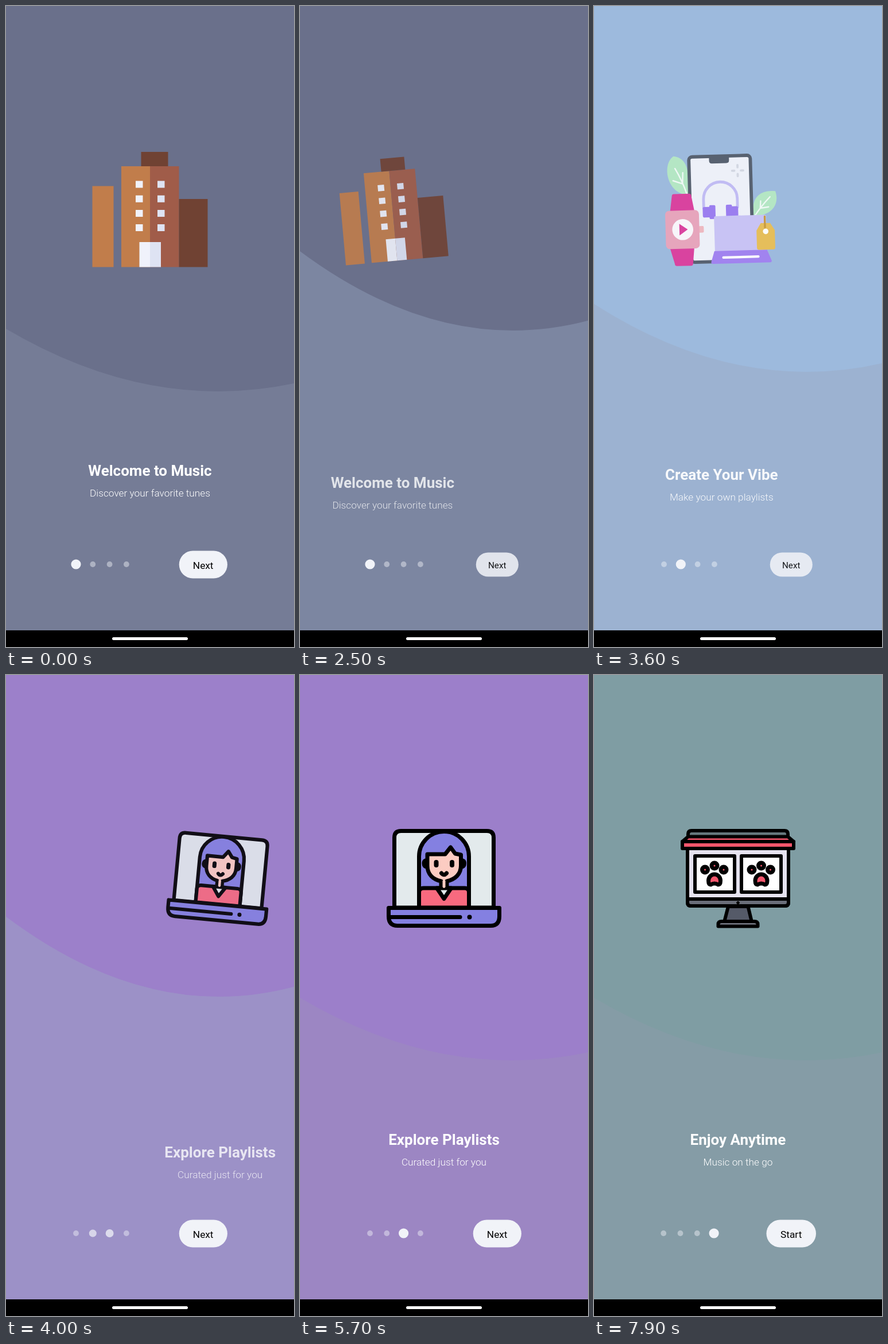
An HTML page that plays this animation: 502 px wide and 1116 px high, repeating every 8 s.

```html
<!DOCTYPE html>
<html lang="en">
<head>
<meta charset="utf-8">
<title>Onboarding</title>
<style>
  html, body { margin: 0; width: 100%; height: 100%; overflow: hidden; background: #000; }
  svg { display: block; width: 502px; height: 1116px; }
  text { font-family: Roboto, "Open Sans", sans-serif; text-anchor: middle; }
  .title { font-size: 26px; font-weight: 700; fill: #fff; }
  .sub { font-size: 17.25px; font-weight: 300; fill: #fff; }
  .label { font-size: 17.25px; fill: #000; }
  .ink { stroke: #000; stroke-width: 7; stroke-linejoin: round; stroke-linecap: round; }
</style>
</head>
<body>
<svg viewBox="0 0 502 1116">
  <defs>
    <g id="paw" class="ink" stroke-width="6" fill="#f4566c">
      <circle cx="-16.5" cy="-8" r="5"/>
      <circle cx="0" cy="-15" r="5"/>
      <circle cx="16" cy="-8" r="5"/>
      <path d="M-10.5 11a10.5 11 0 0 1 21 0q0 7-4 7q-6.500-4-13 0q-4 0-4-7z"/>
    </g>
  </defs>

  <rect id="floor" width="502" height="1116"/>
  <path id="sky"/>

  <g class="page">
    <g class="icon" shape-rendering="geometricPrecision">
      <path fill="#c17d4b" d="M150.500 313.500h37v141h-37zM201 279h50v175.500h-50z"/>
      <path fill="#a05c49" d="M251 279h50.500v175.500H251z"/>
      <path fill="#704233" d="M235.500 254h47v25h-47zM301.500 336h50v118.500h-50z"/>
      <path fill="#f0f2fb" d="M226 304.500h12.500v12H226zm0 25.200h12.500v12H226zm0 25.200h12.500v12H226zm0 25.200h12.500v12H226zM232.500 411H251v43.500h-18.500z"/>
      <path fill="#dee3f3" d="M264 304.500h12.500v12H264zm0 25.200h12.500v12H264zm0 25.200h12.500v12H264zm0 25.200h12.500v12H264zM251 411h19v43.500h-19z"/>
    </g>
    <g class="copy"><text class="title" x="251" y="818">Welcome to Music</text><text class="sub" x="251" y="854">Discover your favorite tunes</text></g>
  </g>

  <g class="page">
    <g class="icon"><g transform="translate(251 354)" stroke-linecap="round">
      <g fill="#b5e8c4" stroke="#f1fbf5" stroke-width="0">
        <path d="M-60-28C-98-30-106-84-84-98C-62-95-54-75-60-28z"/>
        <path d="M58 14C52-18 70-34 98-30C106-4 88 14 58 14z"/>
        <path fill="none" stroke-width="2.500" d="M-62-30Q-70-55-82-76M-69-48L-68-68M-69-48L-86-54M60 13Q72-4 88-20M70 0L71-13M70 0L85-2"/>
      </g>
      <rect x="-56.500" y="-96" width="111" height="190" rx="6" fill="#f0f3fa" stroke="#565f6e" stroke-width="6"/>
      <path fill="#565f6e" d="M-20-96h36v8q0 5-5 5h-26q-5 0-5-5z"/>
      <path stroke="#d5d9e3" stroke-width="4" d="M31-79v4M31-63v4M21-69h4M37-69h4"/>
      <path d="M-32-3V-19a30.500 30.500 0 0 1 61 0V-3" fill="none" stroke="#c3bdf4" stroke-width="5"/>
      <g fill="#9b7cf0">
        <rect x="-34" y="-5" width="15" height="19" rx="3"/><rect x="-22" y="-8" width="11" height="25" rx="2"/>
        <rect x="16" y="-5" width="14" height="19" rx="3"/><rect x="8" y="-8" width="11" height="25" rx="2"/>
      </g>
      <rect x="-14" y="12" width="94" height="64" rx="3" fill="#cac4f5"/>
      <path fill="#a282f0" d="M-15 75H80L88 95q0 3-3 3H-18q-4 0-3-4z"/>
      <path stroke="#fff" stroke-width="4.500" d="M1 87H64"/>
      <path fill="#e8bf57" d="M70 27H87L95 40V71q0 4-4 4H66q-4 0-4-4V40z"/>
      <circle cx="78.500" cy="42" r="5" fill="#fff"/>
      <path stroke="#c99a3e" stroke-width="3.500" d="M77.500 15V35"/>
      <path fill="#dc3f9d" d="M-89-26q0-4 4-4h27q4 0 4 4L-49 2H-93zM-95 67h44L-54 96q0 4-4 4h-25q-4 0-4-4z"/>
      <rect x="-43" y="29" width="10" height="12" rx="2" fill="#f0b8bf"/>
      <rect x="-102" y="0" width="61" height="69" rx="7" fill="#e9a5bb"/>
      <circle cx="-71" cy="34.500" r="19" fill="#fbf8fb"/>
      <path fill="#dc3f9d" d="M-77 24L-62 34.500L-77 45z"/>
    </g></g>
    <g class="copy"><text class="title" x="251" y="818">Create Your Vibe</text><text class="sub" x="251" y="854">Make your own playlists</text></g>
  </g>

  <g class="page">
    <g class="icon ink" fill="none">
      <path fill="#e3eaec" d="M164.500 405V283q0-11.500 11.500-11.500H326q11.500 0 11.500 11.500V405z"/>
      <path fill="#8480e1" d="M207.500 405V316a43.500 43.500 0 0 1 87 0V405z"/>
      <path fill="#fcccc2" d="M222 323q-6-1-6 5t6 6M280.500 323q6-1 6 5t-6 6"/>
      <path fill="#fcccc2" d="M246 374V359C232 356 222 347 222 332V312H253L262.500 300L270.500 311L280.500 313V332C280.500 347 270 356 256 359V374z"/>
      <path stroke-width="8" d="M237.500 326v5M265 326v5"/>
      <path d="M246.500 345Q251 350.500 255.500 345"/>
      <path fill="#f86a7f" d="M207.500 405V378q0-7 8-7H287q7.500 0 7.500 7V405z"/>
      <path fill="#e3eaec" d="M238.500 371L251 389.500L263.500 371z"/>
      <path fill="#fcccc2" stroke="none" d="M248.500 358h5v11q-2.500 4-5 0z"/>
      <path fill="#8480e1" d="M154.500 405.500H347.500V420q0 16.500-15 16.500H170q-15.500 0-15.500-16.500z"/>
      <path d="M156 421.500H279"/>
      <circle cx="295.500" cy="421.500" r="4" fill="#000" stroke="none"/>
    </g>
    <g class="copy"><text class="title" x="251" y="818">Explore Playlists</text><text class="sub" x="251" y="854">Curated just for you</text></g>
  </g>

  <g class="page">
    <g class="icon ink" style="stroke-width:6">
      <path fill="#555a68" d="M234 403H268.500L275 430H227z"/>
      <path fill="#777b86" d="M216.500 437.500V434q0-5 6-5H279.500q6 0 6 5V437.500z"/>
      <path fill="#e6e3ef" d="M163 296H339V396q0 6-6 6H169q-6 0-6-6z"/>
      <path fill="#6a6e79" d="M163 390H339V396q0 6-6 6H169q-6 0-6-6z"/>
      <path d="M251 395l1.500 1.500l-1.500 1.500l-1.500-1.500z" stroke-width="3"/>
      <path fill="#66787d" d="M164 283V277q0-6 6-6H332q6 0 6 6V283z"/>
      <path fill="#f4566c" d="M164 281.500H338L348 290H154z"/>
      <path fill="#f4566c" d="M154 290H348V302H154z"/>
      <path fill="#fff" d="M176 315h69v63h-69zM257 315h69v63h-69z"/>
      <use href="#paw" x="210" y="347"/>
      <use href="#paw" x="291.500" y="347"/>
    </g>
    <g class="copy"><text class="title" x="251" y="818">Enjoy Anytime</text><text class="sub" x="251" y="854">Music on the go</text></g>
  </g>

  <g id="dots" fill="#f1f3f8"><circle/><circle/><circle/><circle/></g>
  <g id="button">
    <rect y="948" height="48" rx="24" fill="#f1f3f8"/>
    <text class="label" x="343.700" y="979"></text>
  </g>
  <rect y="1087" width="502" height="29"/>
  <rect x="185" y="1099" width="132" height="5" rx="2.500" fill="#fff"/>
</svg>

<script>
const LOOP = 8000, WIDTH = 502, SLIDE = 750;
const starts = [2299, 3492, 6656];
const skies = [[106, 112, 139], [157, 186, 221], [156, 127, 202], [127, 157, 163]];
const floors = [[117, 124, 150], [156, 181, 210], [156, 134, 195], [133, 156, 166]];

// Depth of the page effect against slide progress, and button press against ms.
const depthSteps = [[0, 0], [0.25, 0.3], [0.5, 0.36], [0.755, 0.225], [0.9, 0.15], [1, 0]];
const pressSteps = [[-60, 0], [60, 1], [244, 1], [400, 0]];

const $ = id => document.getElementById(id);
const pages = [...document.querySelectorAll(".page")].map(el => ({
  el, icon: el.querySelector(".icon"), copy: el.querySelector(".copy")
}));
const dots = [...$("dots").children];
const pill = $("button").querySelector("rect");
const label = $("button").querySelector("text");

const clamp = v => Math.min(1, Math.max(0, v));
const smooth = v => { v = clamp(v); return v * v * (3 - 2 * v); };
const set = (el, attrs) => { for (const k in attrs) el.setAttribute(k, attrs[k]); };
const mix = (list, i, f) => {
  const a = list[i], b = list[Math.min(i + 1, 3)];
  return `rgb(${a.map((v, k) => Math.round(v + (b[k] - v) * f))})`;
};

function track(steps, x) {
  if (x <= steps[0][0]) return steps[0][1];
  for (let i = 1; i < steps.length; i++) {
    const [x0, y0] = steps[i - 1], [x1, y1] = steps[i];
    if (x < x1) return y0 + (y1 - y0) * (x - x0) / (x1 - x0);
  }
  return steps[steps.length - 1][1];
}

function drawBackground(from, f, d) {
  set($("floor"), { fill: mix(floors, from, f) });
  set($("sky"), {
    fill: mix(skies, from, smooth((f - 0.2) / 0.6)),
    d: `M0 0V${562 - 630 * d}Q251 ${710 - 450 * d} 502 ${657 - 510 * d}V0z`
  });
}

function drawPages(pos, d) {
  pages.forEach(({ el, icon, copy }, i) => {
    const off = i - pos;
    el.style.display = Math.abs(off) < 1 ? "" : "none";
    set(el, { transform: `translate(${off * WIDTH} 0)` });
    set(icon, {
      transform: `translate(251 354) rotate(${Math.sign(off) * 24 * d}) scale(${1 - d / 2}) translate(-251 -354)`,
      opacity: 1 - d / 2
    });
    set(copy, { transform: `translate(0 ${100 * d})`, opacity: 1 - d });
  });
}

function drawControls(from, f, press) {
  const last = from + f >= 2.5;
  const grow = clamp((f - 0.45) / 0.55);
  dots.forEach((dot, i) => {
    const on = i === from ? 1 - grow : i === from + 1 ? grow : 0;
    set(dot, {
      cx: 122 + i * 29.3 - (last ? 0.8 : 0), cy: 972,
      r: 4.9 + 3.7 * on, "fill-opacity": 0.45 + 0.55 * on
    });
  });
  set(pill, { x: last ? 300.5 : 301.7, width: last ? 86.5 : 84.2 });
  label.textContent = last ? "Start" : "Next";
  set($("button"), {
    transform: `translate(343.7 972.5) scale(${1 - 0.12 * press}) translate(-343.7 -972)`,
    opacity: 1 - 0.13 * press
  });
}

function draw(t) {
  let from = 0, f = 0, press = 0;
  starts.forEach((start, i) => {
    if (t < start - 60) return;
    from = i;
    f = smooth((t - start) / SLIDE);
    press = track(pressSteps, t - start);
  });
  if (f === 1) { from++; f = 0; }
  const d = track(depthSteps, f);
  drawBackground(from, f, d);
  drawPages(from + f, d);
  drawControls(from, f, press);
}

const began = performance.now();
function tick() {
  draw((performance.now() - began) % LOOP);
  requestAnimationFrame(tick);
}
tick();
</script>
</body>
</html>
```
